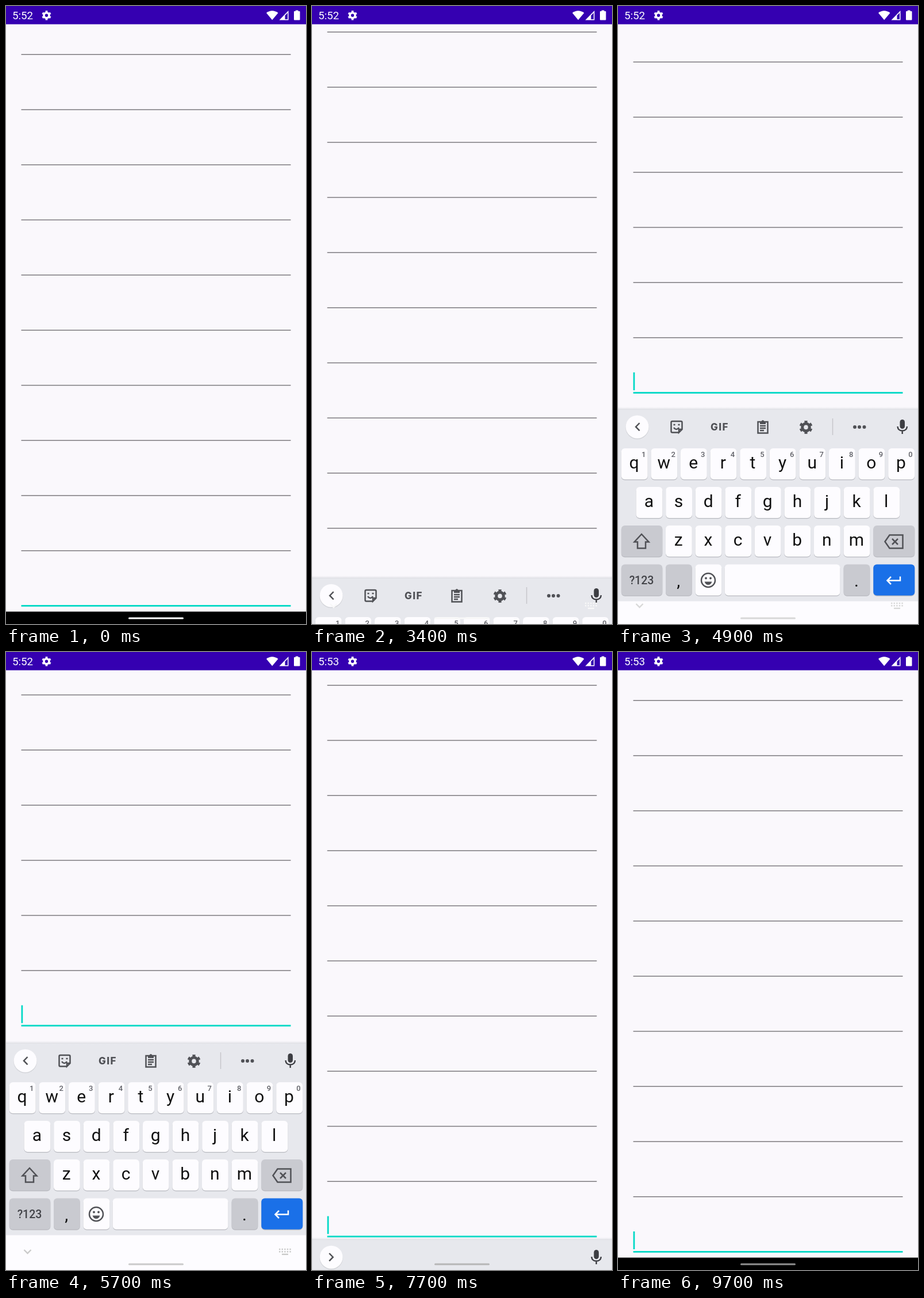
An HTML page that plays this animation: 522 px wide and 1073 px high, repeating every 9.8 s.

```html
<!DOCTYPE html>
<html lang="en">
<head>
<meta charset="utf-8">
<style>
  html, body { margin: 0; height: 100%; overflow: hidden; background: #faf8fc; }
  svg { display: block; width: 100%; height: 100%; font-family: Roboto, Arial, sans-serif; }
  .key { fill: #fdfcff; }
  .mod { fill: #c9cad0; }
  .enter { fill: #1a70e8; }
  .letter { font-size: 30px; fill: #111; text-anchor: middle; }
  .digit { font-size: 13px; font-weight: 500; fill: #606167; text-anchor: middle; }
  .line { fill: none; stroke: #505156; stroke-width: 2.5; }
  .solid { fill: #505156; }
  .gif { font: 800 17px Inter, Roboto, sans-serif; letter-spacing: 1.4px; }
</style>
</head>
<body>
<svg viewBox="0 0 522 1073" preserveAspectRatio="none">
  <defs>
    <g id="gear" fill="none">
      <circle r="4.5" stroke-width="3.6"/>
      <circle r="6.8" stroke-width="2.8" pathLength="12" stroke-dasharray="1 1" stroke-dashoffset="-.5"/>
    </g>
    <linearGradient id="shade" x2="0" y2="1">
      <stop stop-color="#e7e8ed" stop-opacity="0"/>
      <stop offset="1" stop-color="#dcdde2"/>
    </linearGradient>
  </defs>
  <rect width="522" height="1073" fill="#faf8fc"/>

  <g id="list">
    <g id="rows" fill="#7b797d"></g>
    <rect x="26.5" y="1040" width="469" height="2.8" fill="#03d9c6"/>
    <rect id="caret" x="26.5" y="1006" width="2.8" height="31" fill="#03d9c6"/>
  </g>
  <rect y="1051.5" width="522" height="22" fill="#000"/>

  <g id="board">
    <rect y="-5" width="522" height="5" fill="url(#shade)"/>
    <rect width="522" height="333" fill="#e7e8ed"/>
    <rect y="332.5" width="522" height="62" fill="#fdfcff"/>
    <circle cx="33.5" cy="31" r="20.3" fill="#d3d4d9"/>
    <circle cx="33.5" cy="29.7" r="20" fill="#fdfcff"/>
    <path id="toggle" class="line"/>
    <g id="tools">
      <path class="line" d="M106 39.5H94.5Q92.5 39.5 92.5 37.5V22Q92.5 20 94.500 20H109.500Q111.500 20 111.500 22V34L106 39.500V34H111.500M97 31Q101.500 37 106 31"/>
      <path class="line" d="M96.500 26H99.500M104.500 26H107.500"/>
      <text class="solid gif" x="177" y="35.500" text-anchor="middle">GIF</text>
      <path class="line" d="M243.500 21H260.500V40.500H243.500ZM247 28H257M247 32H257M247 36H254"/>
      <path class="solid" d="M247 20H249.500Q252 16 254.500 20H257V25H247Z"/>
      <use href="#gear" transform="translate(327 30.400) scale(1.400)" stroke="#505156"/>
      <path d="M373.500 15V44" stroke="#c5c6cb" stroke-width="1.500"/>
      <g class="solid"><circle cx="412" cy="30" r="3"/><circle cx="420" cy="30" r="3"/><circle cx="428.500" cy="30" r="3"/></g>
    </g>
    <rect x="490.500" y="17" width="8.500" height="16" rx="4.250" fill="#3d3e43"/>
    <path d="M486.500 29Q487 36.500 494.700 36.500T503 29M494.700 36.500V42" fill="none" stroke="#3d3e43" stroke-width="2.400"/>
    <g id="keys"></g>
    <g class="line">
      <path d="M41 216L53.500 229.500H48V240.500H34V229.500H28.500Z"/>
      <path d="M464.500 229L472.500 217.500H495.500V240.500H472.500ZM477 224L487 234M487 224L477 234"/>
      <circle cx="157" cy="296" r="12"/>
    </g>
    <g class="solid">
      <path d="M150.500 298.500H163.500Q161.500 304 157 304T150.500 298.500Z"/>
      <circle cx="153" cy="292.500" r="1.900"/>
      <circle cx="161" cy="292.500" r="1.900"/>
    </g>
    <text x="41" y="303" font-size="19.500" font-weight="500" fill="#424348" text-anchor="middle">?123</text>
    <path d="M491 289.500V296.500H469M475 290L468.500 296.500L475 303" fill="none" stroke="#fff" stroke-width="2.500"/>
  </g>

  <g id="nav" fill="none" stroke-width="2.400">
    <path d="M31.500 1038L37.500 1044L43.500 1038"/>
    <path d="M475 1037H496M475 1041.300H496" stroke-dasharray="2.400 2.200"/>
    <path d="M480 1045.800H491"/>
  </g>
  <rect id="handle" x="213" y="1061.500" width="96" height="3" rx="1.500"/>

  <rect width="522" height="31.700" fill="#3500b1"/>
  <g fill="#fff">
    <text id="clock" x="11" y="23.300" font-size="18.700"></text>
    <use href="#gear" x="70.500" y="16.200" stroke="#fff"/>
    <path d="M453 12Q463 4.500 473.500 12L463.200 24.300Z"/>
    <path d="M475.500 24.500L491.500 8V24.500Z"/>
    <path d="M485.500 16.500L490 12V23H485.500Z" fill="#3500b1"/>
    <path d="M503.800 7.500H508.500V9H510.500Q511.500 9 511.500 10V23.500Q511.500 24.500 510.500 24.500H502Q501 24.500 501 23.500V10Q501 9 502 9H503.800Z"/>
  </g>
</svg>
<script>
  const LOOP = 9800, STEP = 100, HEIGHT = 394, SLIDE = 2840;
  const SHOW = 3083, HIDE = 6325, PITCH = 51.6;
  const $ = id => document.getElementById(id);

  $('rows').innerHTML = Array.from({ length: 10 }, (_, i) =>
    `<rect x="26.5" y="${83.5 + i * 95.72}" width="469" height="1.5"/>`).join('');

  function key(x, y, width, kind, label = '', digit = '') {
    const box = (dy, style) =>
      `<rect x="${x}" y="${y + dy}" width="${width}" height="54" rx="6" ${style}/>`;
    const baseline = /\W/.test(label) ? 38 : 35.3;
    return box(1.3, 'fill="#b9bac0"') + box(0, `class="${kind}"`) +
      `<text class="letter" x="${x + width / 2 - .6}" y="${y + baseline}">${label}</text>` +
      `<text class="digit" x="${x + width - 7}" y="${y + 14.5}">${digit}</text>`;
  }
  const row = (letters, x, y, digits = '') => [...letters].map((c, i) =>
    key(x + i * PITCH, y, 45.8, 'key', c, digits[i])).join('');

  $('keys').innerHTML =
    row('qwertyuiop', 5.8, 67, '1234567890') + row('asdfghjkl', 31.6, 134) +
    key(5.8, 201, 71.5, 'mod') + row('zxcvbnm', 83, 201) + key(444.3, 201, 72, 'mod') +
    key(5.8, 268.5, 71.5, 'mod') + key(83, 268.5, 45.8, 'mod', ',') + key(134.6, 268.5, 45.8, 'key') +
    key(185.8, 268.5, 200.6, 'key') + key(392.6, 268.5, 45.8, 'mod', '.') + key(444.3, 268.5, 72, 'enter');

  // cubic-bezier(.2, 0, 0, 1)
  function ease(x) {
    if (x <= 0) return 0;
    if (x >= 1) return 1;
    let lo = 0, hi = 1;
    for (let i = 0; i < 20; i++) {
      const s = (lo + hi) / 2;
      if (.6 * s * (1 - s) ** 2 + s ** 3 < x) lo = s; else hi = s;
    }
    return lo * lo * (3 - 2 * lo);
  }

  // piecewise linear value through [x, y] points
  function along(points, x) {
    const i = Math.max(1, points.findIndex(p => p[0] >= x));
    const [[x0, y0], [x1, y1]] = [points[i - 1], points[i]];
    return y0 + (y1 - y0) * (x - x0) / (x1 - x0);
  }
  const LIFT = [[0, 0], [52, 26.5], [79, 39], [193, 153], [326, 320], [HEIGHT, 393.7]];
  const TONE = [[0, 255], [3100, 255], [4300, 226], [5700, 202], [6900, 192], [7700, 182], [9700, 145], [LOOP, 142]];

  function draw(now) {
    const t = Math.floor(now % LOOP / STEP) * STEP;
    const height = Math.round(HEIGHT * (ease((t - SHOW) / SLIDE) - ease((t - HIDE) / SLIDE)));
    const tone = along(TONE, t), color = `rgb(${tone},${tone},${tone})`;
    const tools = Math.min(1, Math.max(0, (6300 - t) / 400));

    $('list').setAttribute('transform', `translate(0 ${-along(LIFT, height)})`);
    $('board').setAttribute('transform', `translate(0 ${1073 - height})`);
    $('board').style.display = height ? '' : 'none';
    $('caret').style.opacity = t >= 600 && (t + 400) % 1000 < 500 ? 1 : 0;
    $('tools').style.opacity = tools;
    $('toggle').setAttribute('d', tools > .5 ? 'M37.5 23L31 29.7L37.5 36.4' : 'M30 23L36.5 29.7L30 36.4');
    $('nav').style.opacity = t >= SHOW && t < HIDE ? 1 : 0;
    $('nav').setAttribute('stroke', color);
    $('handle').setAttribute('fill', color);
    $('clock').textContent = t < 7300 ? '5:52' : '5:53';
    requestAnimationFrame(draw);
  }
  draw(0);
</script>
</body>
</html>
```
